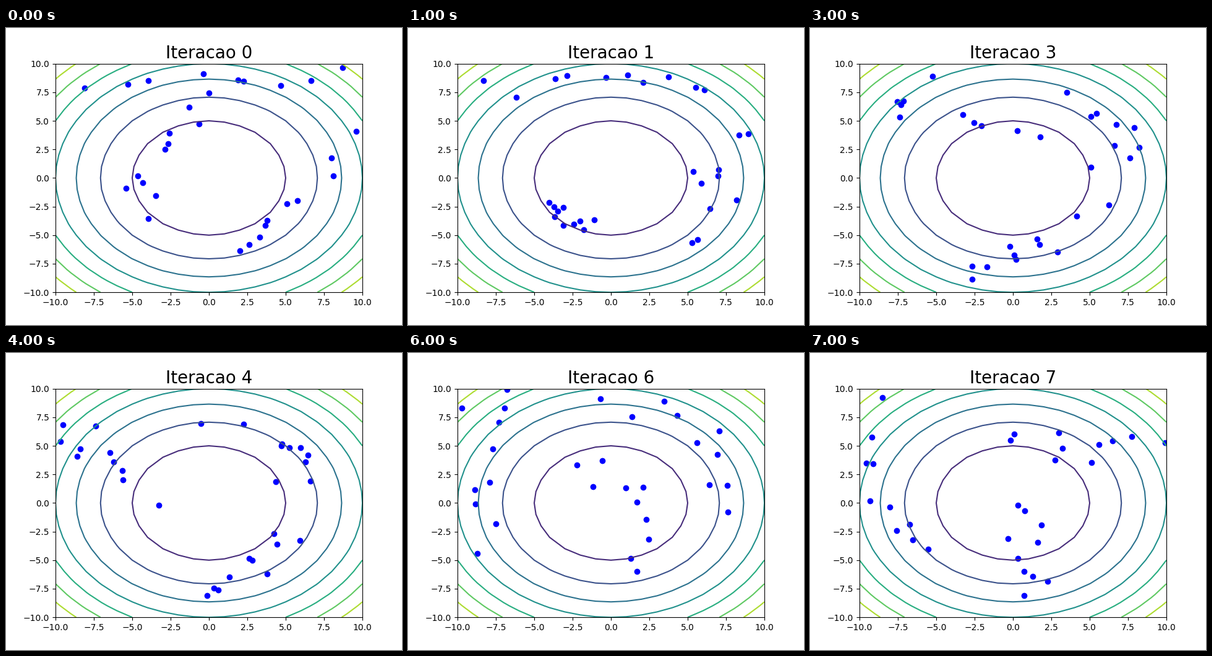
A matplotlib script that plays this animation: 640 by 480 pixels, repeating every 8 s.

```python
import numpy as np
import matplotlib.pyplot as plt
from matplotlib.animation import FuncAnimation

WIDTH, HEIGHT, DPI = 640, 480, 100
STEPS, STRAND_DOTS = 8, 10
LIMIT, SPREAD = 10, 0.8

# The swarm gathers along three strands; each is given by start, middle, end.
STRANDS = {
    0: [[(-8.2, 8), (1.5, 8.5), (8.4, 8.8)],
        [(9.7, 3), (5, -3), (2, -7)],
        [(-0.3, 5), (-4.5, 1), (-3, -3)]],
    2: [[(-9, 7.7), (-1, 8.6), (5, 7)],
        [(7, 5), (8.3, 2), (9, -4)],
        [(-5.8, -8.2), (-2.5, -7.8), (1, -4)]],
    4: [[(-9, 7), (-7, 3.5), (-3, 0.5)],
        [(0, 7.5), (6, 5), (5, 2)],
        [(0, -8.3), (2.5, -5.5), (6.2, -3.4)]],
    5: [[(-5, 6.5), (-8, 2), (0, -7)],
        [(1, 5), (1.5, 2.2), (4.5, -1.5)],
        [(5, 9), (8.5, 3), (6.5, -6)]],
    6: [[(-7.6, 9.5), (-8, 3.5), (-8.7, -5.5)],
        [(-1.5, 4), (1.3, 0.5), (1.2, -6)],
        [(0, 7.5), (6, 6), (8, -1)]],
    7: [[(-8.5, 9), (-8.7, 0), (-4, -3)],
        [(1.8, 0), (1.6, -4), (1.2, -8)],
        [(0, 6), (4, 4.5), (9, 5.8)]],
}


def strands_at(step):
    """Strands of a step, blended from the nearest given ones."""
    keys = list(STRANDS)
    shapes = np.array([STRANDS[k] for k in keys], float)
    columns = shapes.reshape(len(keys), -1).T
    blend = [np.interp(step, keys, column) for column in columns]
    return np.reshape(blend, shapes.shape[1:])


def along(strand):
    """Dots spaced along the parabola through three points."""
    t = np.linspace(0, 1, STRAND_DOTS)[:, None]
    start, middle, end = strand
    return ((1 - t) * (1 - 2 * t) * start + 4 * t * (1 - t) * middle
            + t * (2 * t - 1) * end)


def swarm_at(step):
    dots = np.concatenate([along(s) for s in strands_at(step)])
    rng = np.random.default_rng(step)
    dots += rng.normal(0, SPREAD, dots.shape)
    return np.clip(dots, 0.1 - LIMIT, LIMIT - 0.1)


fig, ax = plt.subplots(figsize=(WIDTH / DPI, HEIGHT / DPI), dpi=DPI)
grid = np.arange(-LIMIT, LIMIT + 1)
gx, gy = np.meshgrid(grid, grid)
ax.contour(gx, gy, gx**2 + gy**2)
swarm, = ax.plot([], [], "bo", zorder=1.5)
title = ax.set_title("", fontsize=20)
ax.set_xlim(-LIMIT, LIMIT)
ax.set_ylim(-LIMIT, LIMIT)


def update(step):
    swarm.set_data(*swarm_at(step).T)
    title.set_text(f"Iteracao {step}")
    return swarm, title


anim = FuncAnimation(fig, update, frames=STEPS, interval=1000,
                     repeat=True, repeat_delay=0)
plt.show()
```
